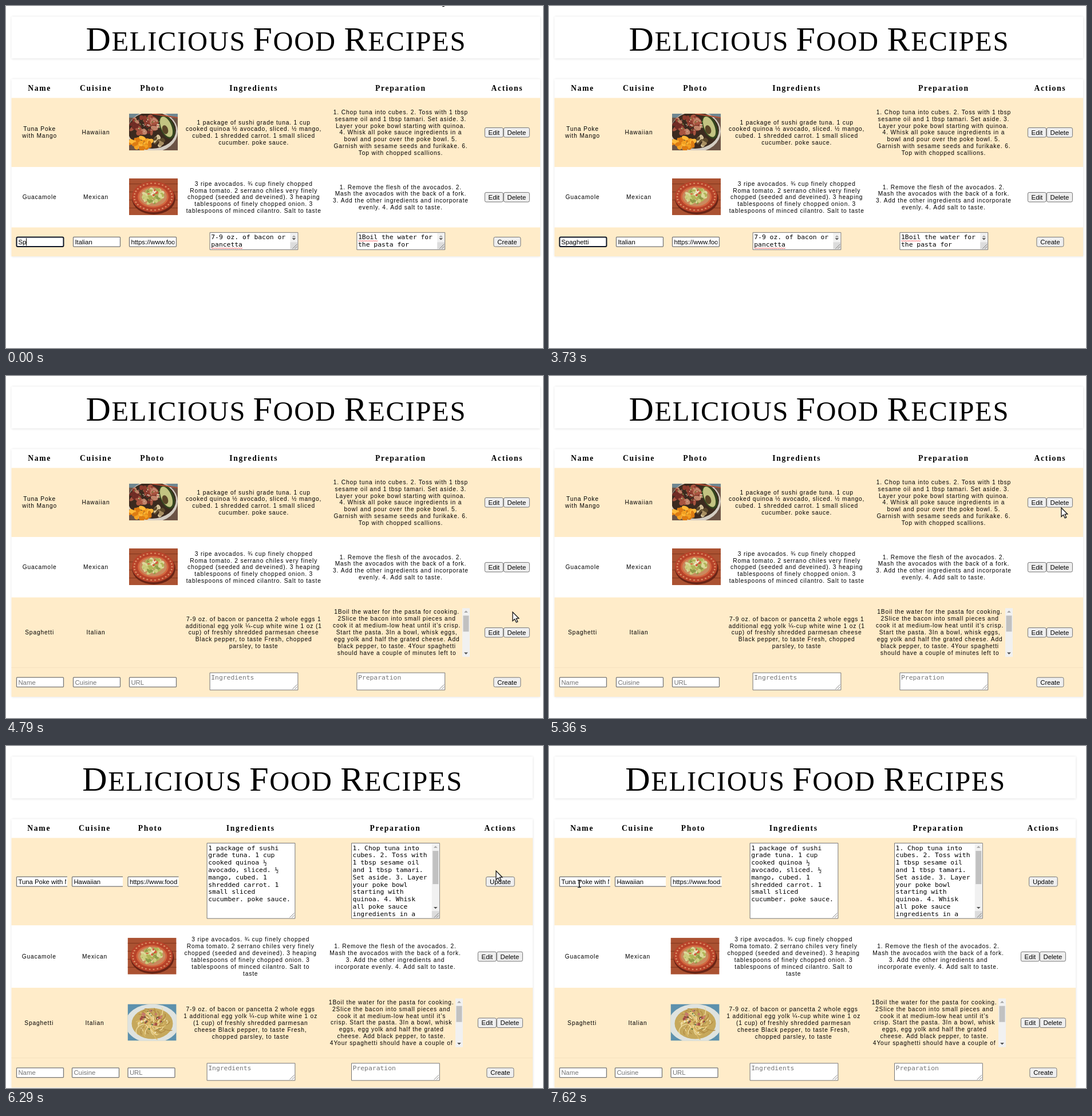
Animation of 938x597 px, one loop 8 s. Source, as an HTML page with a canvas:

```html
<!DOCTYPE html>
<html lang="en">
<head>
<meta charset="utf-8">
<title>Delicious Food Recipes</title>
<style>
html, body { margin: 0; width: 100%; height: 100%; overflow: hidden; background: #fff; }
canvas { display: block; width: 100vw; height: 100vh; }
</style>
</head>
<body>
<canvas id="stage" width="938" height="597"></canvas>
<script>
const ctx = document.getElementById('stage').getContext('2d');
const LOOP = 8000, UNIT = 938 / 1100, LINE = 14 * UNIT;
const CREAM = '#ffecc9', LEFT = 9.5, TOP = 160.5;
const CREATED = 4790, PHOTO_LOADED = 5480, EDITING = 6290;
const FONT = {
  cell: `${12 * UNIT}px "Liberation Sans", Arial, sans-serif`,
  head: `bold ${16 * UNIT}px "Liberation Serif", "Times New Roman", serif`,
  field: `${13.333 * UNIT}px "Liberation Sans", Arial, sans-serif`,
  mono: `${13.333 * UNIT}px "DejaVu Sans Mono", monospace`,
  title: size => `${size}px "Liberation Serif", "Times New Roman", serif`
};
const HEADINGS = ['Name', 'Cuisine', 'Photo', 'Ingredients', 'Preparation', 'Actions'];

const wide = { right: 933, shift: 0, cols: [58.6, 157, 255.6, 432.7, 689.4, 875.4],
  fields: [18, 117, 215], photo: 215, areas: [355.6, 612.4], bar: 797 };
const narrow = { right: 920, shift: -6.3, cols: [57.7, 155, 252, 427.2, 680, 863.4],
  fields: [18, 115, 212.5], photo: 212.5, areas: [350.6, 603], bar: 785 };

const tuna = {
  name: ['Tuna Poke', 'with Mango'], cuisine: 'Hawaiian', photo: drawPoke,
  ingredients: ['1 package of sushi grade tuna. 1 cup', 'cooked quinoa ½ avocado, sliced. ½ mango,',
    'cubed. 1 shredded carrot. 1 small sliced', 'cucumber. poke sauce.'],
  steps: ['1. Chop tuna into cubes. 2. Toss with 1 tbsp', 'sesame oil and 1 tbsp tamari. Set aside. 3.',
    'Layer your poke bowl starting with quinoa.', '4. Whisk all poke sauce ingredients in a',
    'bowl and pour over the poke bowl. 5.', 'Garnish with sesame seeds and furikake. 6.',
    'Top with chopped scallions.']
};
const guacamole = {
  name: ['Guacamole'], cuisine: 'Mexican', photo: drawGuacamole,
  ingredients: ['3 ripe avocados. ¾ cup finely chopped', 'Roma tomato. 2 serrano chiles very finely',
    'chopped (seeded and deveined). 3 heaping', 'tablespoons of finely chopped onion. 3',
    'tablespoons of minced cilantro. Salt to taste'],
  steps: ['1. Remove the flesh of the avocados. 2.', 'Mash the avocados with the back of a fork.',
    '3. Add the other ingredients and incorporate', 'evenly. 4. Add salt to taste.']
};
const guacamoleNarrow = { ...guacamole,
  ingredients: [...guacamole.ingredients.slice(0, 4), 'tablespoons of minced cilantro. Salt to', 'taste'],
  steps: [...guacamole.steps.slice(0, 2), '3. Add the other ingredients and', 'incorporate evenly. 4. Add salt to taste.']
};
const spaghetti = {
  name: ['Spaghetti'], cuisine: 'Italian', photo: drawSpaghetti, scrolls: true,
  ingredients: ['7-9 oz. of bacon or pancetta 2 whole eggs 1', 'additional egg yolk ¼-cup white wine 1 oz (1',
    'cup) of freshly shredded parmesan cheese', 'Black pepper, to taste Fresh, chopped', 'parsley, to taste'],
  steps: ['1Boil the water for the pasta for cooking.', '2Slice the bacon into small pieces and',
    'cook it at medium-low heat until it’s crisp.', 'Start the pasta. 3In a bowl, whisk eggs,',
    'egg yolk and half the grated cheese. Add', 'black pepper, to taste. 4Your spaghetti',
    'should have a couple of minutes left to']
};
const spaghettiNarrow = { ...spaghetti,
  ingredients: ['7-9 oz. of bacon or pancetta 2 whole eggs', '1 additional egg yolk ¼-cup white wine 1 oz',
    '(1 cup) of freshly shredded parmesan', 'cheese Black pepper, to taste Fresh,', 'chopped parsley, to taste'],
  steps: ['1Boil the water for the pasta for cooking.', '2Slice the bacon into small pieces and',
    'cook it at medium-low heat until it’s', 'crisp. Start the pasta. 3In a bowl, whisk',
    'eggs, egg yolk and half the grated', 'cheese. Add black pepper, to taste.', '4Your spaghetti should have a couple of']
};
const draftIngredients = ['7-9 oz. of bacon or', 'pancetta', '2 whole eggs 1'];
const draftSteps = ['1Boil the water for', 'the pasta for', 'cooking. 2Slice'];
const editIngredients = ['1 package of sushi', 'grade tuna. 1 cup', 'cooked quinoa ½', 'avocado, sliced. ½',
  'mango, cubed. 1', 'shredded carrot. 1', 'small sliced', 'cucumber. poke sauce.'];
const editSteps = ['1. Chop tuna into', 'cubes. 2. Toss with', '1 tbsp sesame oil', 'and 1 tbsp tamari.',
  'Set aside. 3. Layer', 'your poke bowl', 'starting with', 'quinoa. 4. Whisk', 'all poke sauce',
  'ingredients in a', 'bowl and pour'];

// Times at which the letters after "Sp" are typed, spans in which the caret shows
const keyTimes = [290, 910, 1260, 2060, 2310, 2490, 2720];
const caretSpans = [[0, 860], [910, 1870], [2060, 3300], [3860, 4420]];
const pressSpans = [[4640, CREATED], [6180, EDITING]];
const pointerPath = [[3260, 757, -17], [3500, 850, 110], [3700, 942, 300], [3840, 942, 430],
  [4070, 897, 424], [4250, 885, 412], [5080, 885, 412], [5360, 895, 230], [5740, 856, 218],
  [6580, 856, 218], [6800, 760, 224], [7150, 250, 238], [7420, 57, 241], [7620, 53, 240]];

let now = 0, pointer = { x: 0, y: 0 }, overField = false;

const during = spans => spans.some(([a, b]) => now >= a && now < b);
const pointerIn = (x, y, w, h) =>
  pointer.x >= x && pointer.x < x + w && pointer.y >= y && pointer.y < y + h;

function pointerAt(t) {
  const next = pointerPath.findIndex(p => p[0] > t);
  const [t1, x1, y1] = pointerPath.at(next < 0 ? -1 : next);
  const [t0, x0, y0] = next > 0 ? pointerPath[next - 1] : [t1 - 1, x1, y1];
  const k = Math.max(0, Math.min(1, (t - t0) / (t1 - t0)));
  return { x: x0 + (x1 - x0) * k, y: y0 + (y1 - y0) * k };
}

function text(str, x, y, font, { color = '#000', align = 'left', spacing = 0 } = {}) {
  ctx.font = font;
  ctx.letterSpacing = spacing + 'px';
  ctx.textAlign = align;
  ctx.fillStyle = color;
  ctx.fillText(str, x, y);
}

function lines(list, cx, cy) {
  list.forEach((str, i) => text(str, cx, cy + (i - (list.length - 1) / 2) * LINE + 3.7,
    FONT.cell, { align: 'center', spacing: UNIT }));
}

function rect(x, y, w, h, color) {
  ctx.fillStyle = color;
  ctx.fillRect(x, y, w, h);
}

function box(x, y, w, h, fill, border, radius = 0, weight = 1) {
  ctx.beginPath();
  ctx.roundRect(x + 0.5, y + 0.5, w - 1, h - 1, radius);
  ctx.fillStyle = fill;
  ctx.fill();
  ctx.lineWidth = weight;
  ctx.strokeStyle = border;
  ctx.stroke();
}

function clipped(x, y, w, h, draw) {
  ctx.save();
  ctx.beginPath();
  ctx.rect(x, y, w, h);
  ctx.clip();
  draw();
  ctx.restore();
}

function polyline(points, color, width) {
  ctx.beginPath();
  points.forEach(([x, y]) => ctx.lineTo(x, y));
  ctx.lineWidth = width;
  ctx.strokeStyle = color;
  ctx.stroke();
}

function card(y, w, h) {
  ctx.save();
  ctx.shadowColor = 'rgba(0,0,0,.14)';
  ctx.shadowBlur = 4;
  rect(LEFT, y, w, h, '#fff');
  ctx.restore();
}

function arrow(x, y, dir, color) {
  ctx.beginPath();
  ctx.moveTo(x - 3.4, y - 1.7 * dir);
  ctx.lineTo(x + 3.4, y - 1.7 * dir);
  ctx.lineTo(x, y + 1.7 * dir);
  ctx.fillStyle = color;
  ctx.fill();
}

function scrollbar(x, y, h, thumb) {
  rect(x, y, 13, h, '#f1f1f1');
  if (thumb) rect(x + 1.5, y + 13, 10, thumb, '#c1c1c1');
  arrow(x + 6.5, y + 6, -1, '#a3a3a3');
  arrow(x + 6.5, y + h - 6, 1, '#505050');
}

function button(label, x, cy, w) {
  const y = cy - 8.8, h = 17.6;
  const hover = pointerIn(x, y, w, h), pressed = hover && during(pressSpans);
  const [fill, border] = pressed ? ['#f5f5f5', '#8d8d8d'] : hover ? ['#e5e5e5', '#4f4f4f'] : ['#efefef', '#767676'];
  box(x, y, w, h, fill, border, 2.5);
  text(label, x + w / 2, cy + 4.1, FONT.field, { align: 'center' });
}

function input(value, x, cy, { w = 83, cut = 0, color, focused } = {}) {
  const y = cy - 8.8, h = 17.6;
  overField ||= pointerIn(x, y, w, h);
  clipped(x - 2, y - 2, w + (cut ? 2 : 4), h + 4, () => focused
    ? box(x, y, w, h, '#fff', '#0c1424', 2, 2)
    : box(x, y, w + cut, h, '#fff', '#767676', 1, 1.3));
  clipped(x, y, w - (cut ? 2 : 3.5), h, () => text(value, x + 3.4, cy + 4.1, FONT.field, { color }));
  if (focused && during(caretSpans)) {
    ctx.font = FONT.field;
    ctx.letterSpacing = '0px';
    rect(Math.round(x + 3.4 + ctx.measureText(value).width), cy - 6.4, 1, 13, '#000');
  }
}

function textarea(list, x, cy, { h = 31, color, scroll, thumb, misspelt } = {}) {
  const w = 154.8, y = cy - 1.4 - h / 2, right = x + w, bottom = y + h;
  overField ||= pointerIn(x, y, w, h);
  box(x, y, w, h, '#fff', '#767676');
  clipped(x + 1, y + 1, w - 2, h - 2, () => {
    list.forEach((str, i) => text(str, x + 2.6, y + 12.5 + i * 15 * UNIT, FONT.mono, { color }));
    if (misspelt) {
      const [row, length] = misspelt, wave = [];
      for (let i = 0; i <= length * 4; i++) wave.push([x + 3 + i * 1.7, y + 14.6 + row * 12.8 + i % 2 * 1.3]);
      polyline(wave, '#f33', 0.8);
    }
    if (scroll) {
      scrollbar(right - 14, y + 1, h - 14, thumb);
      rect(right - 14, bottom - 13.5, 13, 12.5, '#dcdcdc');
    }
    for (const d of [4, 8]) polyline([[right - 2 - d, bottom - 2], [right - 2, bottom - 2 - d]], '#666', 0.8);
  });
}

function ellipse(x, y, rx, ry, color, turn = 0) {
  ctx.beginPath();
  ctx.ellipse(x, y, rx, ry, turn, 0, 7);
  ctx.fillStyle = color;
  ctx.fill();
}

function randomFrom(seed) {
  return () => (seed = seed * 16807 % 2147483647) / 2147483647;
}

function scatter(seed, count, cx, cy, rx, ry, size, colors) {
  const random = randomFrom(seed);
  for (let i = 0; i < count; i++) {
    const a = random() * 6.28, r = Math.sqrt(random());
    ellipse(cx + Math.cos(a) * r * rx, cy + Math.sin(a) * r * ry, size * (0.6 + random()),
      size * (0.5 + random() * 0.6), colors[i % colors.length], random() * 3);
  }
}

function drawPoke() {
  rect(0, 0, 85, 64, '#6b5345');
  rect(0, 0, 85, 7, '#6f8791');
  ellipse(41, 31, 44, 36, '#d3ccc2');
  ellipse(40, 29, 42, 32, '#3b2a1f');
  scatter(11, 55, 29, 20, 26, 15, 4, ['#8d3b2e', '#a8543f', '#6f2c25', '#c2846a']);
  ellipse(66, 23, 12, 22, '#34451f', -0.4);
  ellipse(65, 23, 9, 19, '#c3c482', -0.4);
  ellipse(63, 28, 5, 8, '#5a4527', -0.3);
  scatter(5, 30, 20, 51, 20, 10, 4.5, ['#f3a020', '#ffb938', '#dd7c13']);
  scatter(9, 20, 52, 48, 9, 8, 3, ['#a98f62', '#5d4a2c', '#d9c69b']);
  scatter(21, 34, 31, 19, 24, 13, 0.9, ['#f3dfc7', '#748a45']);
  polyline([[40, 0], [85, 7]], '#b34f35', 2);
}

function drawGuacamole() {
  rect(0, 0, 85, 64, '#ab5232');
  for (let y = 9; y < 64; y += 14) rect(0, y, 85, 1.2, '#87391f');
  ellipse(43, 35, 38, 28, '#6b2516');
  ellipse(42, 32, 37, 27, '#b8432a');
  for (let i = 0; i < 30; i++) {
    const a = i / 30 * Math.PI * 2;
    ellipse(42 + Math.cos(a) * 33, 32 + Math.sin(a) * 23.5, 1.5, 1.2, '#dc9468');
  }
  ellipse(42, 32, 27, 19, '#d3663f');
  ellipse(42, 32, 24, 16.5, '#c98a5e');
  scatter(7, 70, 42, 31, 18, 12, 3.2, ['#b1b557', '#cdcd7e', '#8f9a48', '#dcd99c']);
  scatter(13, 10, 41, 25, 8, 5, 2, ['#d65a3a', '#f0e4c5']);
}

function drawSpaghetti() {
  rect(0, 0, 85, 64, '#5d91ad');
  ellipse(43, 34, 47, 34, '#dfe3df');
  ellipse(43, 34, 36, 27, '#c6a85c');
  const random = randomFrom(31);
  for (let i = 0; i < 75; i++) {
    const a = random() * 6.28, r = random() * 24;
    ctx.beginPath();
    ctx.ellipse(43 + Math.cos(a) * r, 34 + Math.sin(a) * r * 0.75, 5 + random() * 10, 3 + random() * 6, a, 0, 3.6);
    ctx.lineWidth = 1.3;
    ctx.strokeStyle = ['#f1dda0', '#dfbd69', '#b28b43'][i % 3];
    ctx.stroke();
  }
  scatter(17, 15, 44, 24, 21, 14, 2.6, ['#a34f43', '#c5796a']);
  scatter(3, 24, 43, 31, 27, 20, 1.1, ['#48743a', '#f7f0d5']);
}

function photo(draw, x, y) {
  clipped(x, y, 85.3, 64, () => {
    ctx.translate(x, y);
    draw();
  });
}

function recipeRow(layout, recipe, cy, showPhoto = true) {
  const [name, cuisine, , ingredients, steps, actions] = layout.cols;
  lines(recipe.name, name, cy);
  lines([recipe.cuisine], cuisine, cy);
  if (showPhoto) photo(recipe.photo, layout.photo, cy - 32.8);
  lines(recipe.ingredients, ingredients, cy);
  lines(recipe.steps, steps - (recipe.scrolls ? 6.8 : 0), cy - (recipe.scrolls ? 0.5 : 0));
  if (recipe.scrolls) scrollbar(layout.bar, cy - 42.5, 85, 28);
  button('Edit', actions - 39.5, cy, 33);
  button('Delete', actions - 6.5, cy, 46);
}

function draftRow(layout, cy) {
  const focused = now < 4640;
  const typed = 'Spaghetti'.slice(0, 2 + keyTimes.filter(k => now >= k).length);
  ['', 'Italian', 'https://www.food'].forEach((value, i) =>
    input(i ? value : typed, layout.fields[i], cy, { focused: !i && focused }));
  textarea(draftIngredients, layout.areas[0], cy, { scroll: true, misspelt: [1, 8] });
  textarea(draftSteps, layout.areas[1], cy, { scroll: true, misspelt: [0, 5] });
  button('Create', layout.cols[5] - 24, cy, 48);
}

function emptyRow(layout, cy) {
  const color = '#757575';
  ['Name', 'Cuisine', 'URL'].forEach((hint, i) => input(hint, layout.fields[i], cy, { color }));
  ['Ingredients', 'Preparation'].forEach((hint, i) => textarea([hint], layout.areas[i], cy, { color }));
  button('Create', layout.cols[5] - 24, cy, 48);
}

function editRow(layout, cy) {
  ['Tuna Poke with Mango', 'Hawaiian', 'https://www.food'].forEach((value, i) =>
    input(value, layout.fields[i], cy, { w: 89, cut: 8 }));
  textarea(editIngredients, layout.areas[0], cy, { h: 132.5 });
  textarea(editSteps, layout.areas[1], cy, { h: 132.5, scroll: true, thumb: 58 });
  button('Update', layout.cols[5] - 25.3, cy, 50.6);
}

function header(layout) {
  card(18.5, layout.right - LEFT, 73);
  [['Delicious', 139.5], ['Food', 431.5], ['Recipes', 590.5]].forEach(([word, x]) => {
    const spacing = 1.7;
    x += layout.shift;
    text(word[0], x, 78, FONT.title(60), { spacing });
    const advance = ctx.measureText(word[0]).width;
    text(word.slice(1).toUpperCase(), x + advance, 78, FONT.title(48.5), { spacing });
  });
}

function table(layout, edges, rows) {
  card(127.5, layout.right - LEFT, edges.at(-1) - 127.5);
  HEADINGS.forEach((label, i) => text(label, layout.cols[i], 148.2, FONT.head,
    { align: 'center', spacing: 2 * UNIT }));
  rows.forEach((draw, i) => {
    const top = edges[i], bottom = edges[i + 1];
    if (i !== 1) rect(LEFT, top, layout.right - LEFT, bottom - top, CREAM);
    if (i === 3) rect(LEFT, top - 0.5, layout.right - LEFT, 1, '#f6e2c0');
    draw((top + bottom) / 2);
  });
}

function drawPointer({ x, y }) {
  ctx.save();
  ctx.translate(x, y);
  if (overField) {
    for (const [color, width] of [['#fff', 3.2], ['#000', 1.5]]) {
      polyline([[-3, -5.5], [3, -5.5]], color, width);
      polyline([[0, -5.5], [0, 6.5]], color, width);
      polyline([[-3, 6.5], [3, 6.5]], color, width);
    }
  } else {
    ctx.beginPath();
    [[0, 0], [0, 15.5], [3.6, 12.3], [6.3, 18], [8.8, 16.9], [6.2, 11.3], [10.8, 11]]
      .forEach(([px, py]) => ctx.lineTo(px, py));
    ctx.closePath();
    ctx.fillStyle = '#fff';
    ctx.fill();
    ctx.lineWidth = 1.3;
    ctx.strokeStyle = '#111';
    ctx.stroke();
  }
  ctx.restore();
}

function render(time) {
  now = time % LOOP;
  pointer = pointerAt(now);
  overField = false;
  rect(0, 0, 938, 597, '#fff');
  const layout = now < EDITING ? wide : narrow;
  const recipe = (data, showPhoto) => cy => recipeRow(layout, data, cy, showPhoto);
  const empty = cy => emptyRow(layout, cy);
  header(layout);
  if (now < CREATED) {
    table(layout, [TOP, 281, 386.5, 437], [recipe(tuna), recipe(guacamole), cy => draftRow(layout, cy)]);
  } else if (now < EDITING) {
    table(layout, [TOP, 281, 386.5, 509, 560],
      [recipe(tuna), recipe(guacamole), recipe(spaghetti, now >= PHOTO_LOADED), empty]);
  } else {
    table(layout, [TOP, 313, 422, 544.5, 596],
      [cy => editRow(layout, cy), recipe(guacamoleNarrow), recipe(spaghettiNarrow), empty]);
  }
  drawPointer(pointer);
}

const start = performance.now();
function tick() {
  render(performance.now() - start);
  requestAnimationFrame(tick);
}
tick();
</script>
</body>
</html>
```
